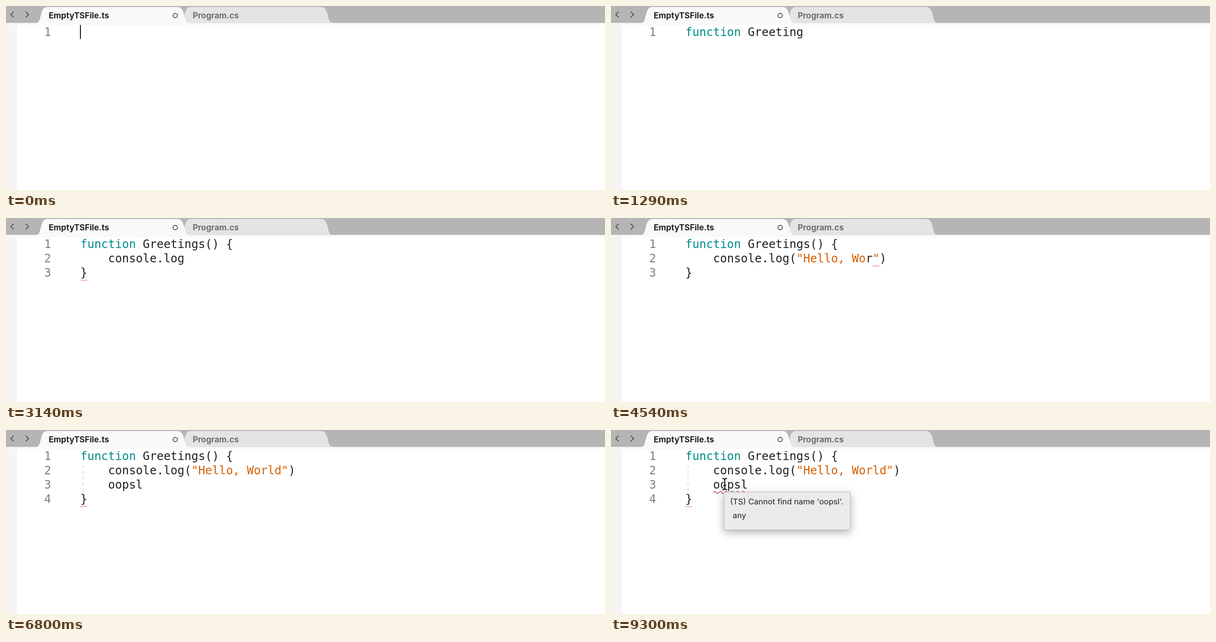
Write an HTML page that moves like this. It is 1248 px wide and 386 px high and loops after 9400 ms.

```html
<!DOCTYPE html>
<html lang="en">
<head>
<meta charset="utf-8">
<title>Editor</title>
<style>
  html, body { margin: 0; width: 100%; height: 100%; overflow: hidden; background: #fff; }
  svg { display: block; }
  .mono { font: 24px "DejaVu Sans Mono", monospace; fill: #222; }
  .num { fill: #80807a; }
  .key { fill: #008b8b; }
  .str { fill: #d75f00; }
  .tab { font: 700 17px Inter, sans-serif; }
  .tip { font: 16.5px Inter, sans-serif; fill: #222; }
  .box { stroke: #b8b8b8; stroke-width: 1; filter: drop-shadow(0 5px 9px rgba(0, 0, 0, .3)); }
  .item { fill: #444; }
  .hit { font-weight: 700; fill: #1350d0; }
  .on, .on .hit { fill: #fff; }
  .icon { font: 700 13px Inter, sans-serif; text-anchor: middle; fill: #fff; }
  .line { fill: none; stroke: #444; stroke-width: 1.7; }
</style>
</head>
<body>
<svg width="1248" height="386" viewBox="0 0 1248 386">
  <defs>
    <path id="tab" d="M62 36C70 35 70 28 73 18C76 6 79 2 88 2H355C365 2 368 6 371 18C374 28 374 35 382 36Z"/>
  </defs>
  <rect width="1248" height="36" fill="#b5b5b5"/>
  <rect y="35.5" width="1248" height="5" fill="#f9f9f9"/>
  <rect y="40" width="23" height="346" fill="#f5f5f5"/>
  <use href="#tab" x="299" fill="#e4e4e4"/>
  <use href="#tab" fill="#f9f9f9"/>
  <path class="line" d="M16 12L10 18L16 24M41 12L47 18L41 24"/>
  <circle class="line" cx="352.5" cy="20" r="4.6"/>
  <text class="tab" x="89" y="26" fill="#222">EmptyTSFile.ts</text>
  <text class="tab" x="389" y="26" fill="#6e6e6e">Program.cs</text>
  <g id="view"></g>
</svg>
<script>
const LOOP = 9400, LEFT = 155, TOP = 40, CHAR = 14.448, LINE = 30, ROW = 36;
const colX = col => LEFT + col * CHAR;
const rowY = row => TOP + row * LINE;

// Completion entries: the first letter picks the icon.
const menu = (row, col, hits, items, selected, width, thumb) =>
  ({ row, col, hits, items: items.split(' '), selected, width, thumb });

const fItems = 'Mfocus OFocusEvent Ofor OFormData OframeElement Oframes Ofunction OFunction';
const fuItems = 'Ofunction OFunction OFullscreenOptions OFunctionStringCallback OPushSubscription OSVGFEFuncAElement OSVGFEFuncBElement OSVGFEFuncGElement';
const cItems = 'Mclose Oclosed OCloseEvent OComment OCompositionEvent Mconfirm Oconsole OConsole';
const coItems = 'OComment OCompositionEvent Mconfirm Oconsole OConsole Oconst Ocontinue OConvolverNode';
const conItems = 'Oconsole OConsole Oconst OConstantSourceNode Ocontinue OConvolverNode Mconfirm OIconOptions';
const logItems = 'Massert Mclear Mcount Mdebug Mdir Mdirxml Merror Mgroup';
const oItems = 'Oobject OObject OOffscreenCanvas Oonabort Oonblur Oonchange Oonclick Oopener';
const ooItems = 'Oboolean OBoolean OlocationbarOptions OBookmark Otoolbar OTooltip Mscroll OScrollOptions';

const fMenu = menu(0, 0, 1, fItems, 6, 354, 110);
const fuMenu = menu(0, 0, 2, fuItems, 0, 601, 4);
const cMenu = menu(1, 4, 1, cItems, 6, 354, 33);
const coMenu = menu(1, 4, 2, coItems, 3, 601, 4);
const conMenu = menu(1, 4, 3, conItems, 0, 601, 4);
const consMenu = menu(1, 4, 4, 'Oconsole OConsole', 0, 354);
const dotMenu = menu(1, 12, 0, logItems, 0, 254, 4);
const logMenu = menu(1, 12, 1, 'Mlog Mlist', 0, 200);
const oMenu = menu(2, 4, 1, oItems, 0, 430, 4);
const ooMenu = menu(2, 4, 2, ooItems, 0, 570, 4);

const head = 'function Greetings() {';
const body = text => `${head}\n    ${text}\n}`;
const hello = 'console.log("Hello, World")';
const full = text => body(`${hello}\n    ${text}`);

// Each step: time, text with "|" where the caret shows, extras.
const steps = [
  [0, '|'], [70, 'f'], [100, 'f|', { menu: fMenu }], [140, 'fu', { menu: fMenu }],
  [180, 'fun|', { menu: fuMenu }], [220, 'func|', { menu: fuMenu }],
  [400, 'functio', { menu: fuMenu }], [470, 'function|'],
  [650, 'function '], [690, 'function |'], [740, 'function G'], [810, 'function Gr'],
  [890, 'function Gre'], [930, 'function Gre|'], [980, 'function Gree'],
  [1060, 'function Greet'], [1130, 'function Greeti'], [1210, 'function Greetin'],
  [1290, 'function Greeting'], [1420, 'function Greetings'], [1470, 'function Greetings|'],
  [1640, 'function Greetings()'], [1690, 'function Greetings(|)'],
  [1800, 'function Greetings()|'], [1880, 'function Greetings() '],
  [1960, head + '}'], [2070, body('|')],
  [2270, body('c')], [2340, body('co|'), { menu: cMenu }], [2370, body('co|'), { menu: coMenu }],
  [2520, body('con'), { menu: coMenu }], [2570, body('cons'), { menu: conMenu }],
  [2620, body('conso'), { menu: consMenu }], [2670, body('consol'), { menu: consMenu }],
  [2720, body('console'), { menu: consMenu }], [2770, body('console|')],
  [2940, body('console.')], [2980, body('console.|'), { menu: dotMenu }],
  [3050, body('console.l'), { menu: logMenu }], [3100, body('console.lo'), { menu: logMenu }],
  [3140, body('console.log')], [3270, body('console.log()')],
  [3390, body('console.log(|)'), { signature: true }],
  [3570, body('console.log("|")'), { signature: true, mark: 17 }],
];

// A new letter stays dark, with its closing quote marked, until it is coloured.
[3740, 3830, 3910, 4000, 4090, 4180, 4270, 4360, 4450, 4540, 4610, 4720].forEach((time, i) => {
  const text = 'Hello, World'.slice(0, i + 1), last = i === 11;
  steps.push([time, body(`console.log("${text}")`), { fresh: true, mark: 18 + i }]);
  steps.push([time + (last ? 100 : 30), body(`console.log("${text}${last ? '|' : ''}")`)]);
});

steps.push(
  [5070, body(hello)], [5130, body(hello + '|')], [5220, full('')], [5300, full('|')],
  [5470, full('o')], [5510, full('o|'), { menu: oMenu }], [5600, full('oo'), { menu: oMenu }],
  [5670, full('oo|'), { menu: ooMenu }], [5750, full('oop'), { menu: ooMenu }],
  [5820, full('oop|'), { menu: ooMenu }], [5900, full('oops')], [5970, full('oopsl')]
);
for (let time = 6050, on = true; time < LOOP; time += 250, on = !on)
  steps.push([time, full(on ? 'oopsl|' : 'oopsl')]);
steps.push([6700, full('oopsl|')], [7900, full('oopsl')]);

const pointerPath = [[8050, 224, 242], [8090, 214, 182], [8130, 212, 128],
  [8170, 214, 99], [8210, 227, 104], [8250, 237, 113.5]];
pointerPath.slice(1).forEach(([time]) => steps.push([time, full('oopsl|')]));
steps.sort((a, b) => a[0] - b[0]);

const rect = (x, y, w, h, attrs) => `<rect x="${x}" y="${y}" width="${w}" height="${h}" ${attrs}/>`;
const label = (x, y, text, cls) => `<text x="${x}" y="${y}" class="${cls}">${text}</text>`;
const span = (cls, text) => `<tspan class="${cls}">${text}</tspan>`;
const underline = (row, col) => rect(colX(col), rowY(row) + 29, 14, 3, 'fill="#f6c0d0"');

function colour(text, fresh) {
  return text
    .replace(/"([^"]*)"/, (all, inner) => fresh
      ? span('str', '"' + inner.slice(0, -1)) + inner.slice(-1) + span('str', '"')
      : span('str', all))
    .replace(/^function\b/, span('key', 'function'));
}

function drawLine(source, row, fresh) {
  const at = source.indexOf('|'), text = source.replace('|', '');
  const indent = text.search(/\S|$/);
  return label(79.5, rowY(row) + 23, row + 1, 'mono num') +
    label(colX(indent), rowY(row) + 23, colour(text.trim(), fresh), 'mono') +
    (at < 0 ? '' : rect(colX(at) - 0.8, rowY(row), 1.8, 29, 'fill="#000"'));
}

function drawItem(entry, x, y, hits, selected) {
  const name = entry.slice(1), cx = x + 20.5, cy = y + 17.5;
  const blue = '#1350d4', fill = selected ? '#fff' : '#74a7ec', ink = selected ? blue : '#fff';
  const icon = entry[0] === 'M'
    ? `<text class="icon" x="${cx}" y="${cy + 4.7}" style="fill:${ink}">M</text>`
    : `<circle cx="${cx}" cy="${cy}" r="4" fill="none" stroke="${ink}" stroke-width="2"/>`;
  return rect(cx - 7.5, cy - 7.5, 15, 15, `fill="${fill}"`) + icon +
    label(x + 39.5, y + 27, span('hit', name.slice(0, hits)) + name.slice(hits),
      'mono item' + (selected ? ' on' : ''));
}

function drawMenu({ row, col, hits, items, selected, width, thumb }) {
  const x = colX(col) - 40, y = rowY(row) + 34;
  return rect(x, y - 0.5, width, items.length * ROW + 1, 'class="box" fill="#fff"') +
    rect(x, y + selected * ROW, width, ROW, 'fill="#1350d4"') +
    items.map((entry, i) => drawItem(entry, x, y + i * ROW, hits, i === selected)).join('') +
    (thumb ? rect(x + width - 14, y + thumb, 10.5, 36, 'rx="5" fill="#777"') : '');
}

const drawSignature = () => rect(388, 18, 433, 51, 'class="box" fill="#ebebeb"') +
  label(401, 44, 'log(message?: any, ...optionalParams: any[]): void', 'tip');

const drawTooltip = () => rect(235.5, 130.5, 263, 79, 'class="box" fill="#ebebeb"') +
  label(248, 156, "(TS) Cannot find name 'oopsl'.", 'tip') +
  label(253.5, 185, 'any', 'tip key');

function drawSquiggle() {
  let d = 'M213 131';
  for (let i = 0; i < 6; i++) d += 'q3 -4 6 0t6 0';
  return `<path d="${d}" fill="none" stroke="#e0808c" stroke-width="2.6"/>`;
}

function drawPointer(time) {
  const [, x, y] = pointerPath.filter(p => p[0] <= time).pop();
  const d = 'M-5 -12Q0 -12 0 -8V8Q0 12 -5 12M5 -12Q0 -12 0 -8M0 8Q0 12 5 12M-3 3H3';
  return `<g transform="translate(${x} ${y})" fill="none">
    <path d="${d}" stroke="#fff" stroke-width="4.5"/><path d="${d}" stroke="#000" stroke-width="1.9"/></g>`;
}

function draw([time, text, extra = {}]) {
  const lines = text.split('\n');
  const marked = time >= 2070 && time < 3390 || time >= 5220;
  return [
    time >= 6700 && '<path d="M160.5 74V129" stroke="#d8d8d8" stroke-width="1.6" stroke-dasharray="6"/>',
    marked && underline(lines.length - 1, 0),
    extra.mark && underline(1, extra.mark),
    ...lines.map((line, row) => drawLine(line, row, extra.fresh)),
    time >= 7900 && drawSquiggle(),
    extra.menu && drawMenu(extra.menu),
    extra.signature && drawSignature(),
    time >= 8300 && drawTooltip(),
    time >= 8050 && drawPointer(time),
  ].filter(Boolean).join('');
}

const view = document.getElementById('view');
const start = performance.now();
let shown;
function tick(now) {
  const time = Math.max(0, now - start) % LOOP;
  const step = steps.findLast(s => s[0] <= time);
  if (step !== shown) view.innerHTML = draw(shown = step);
  requestAnimationFrame(tick);
}
tick(start);
</script>
</body>
</html>
```
